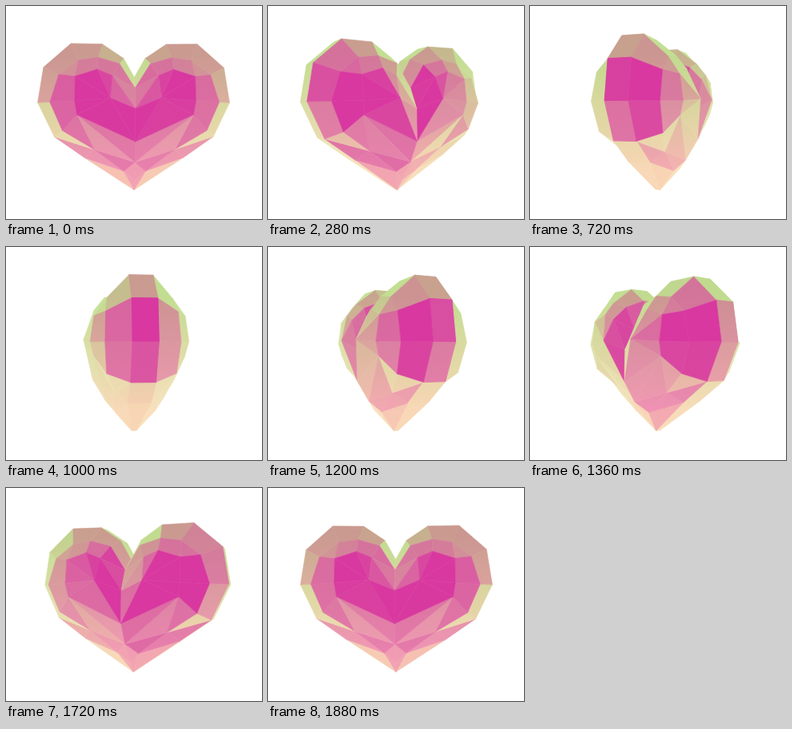
Animation, 320 px wide and 267 px high, one loop 1.92 s. Source, as an HTML page with a canvas:

```html
<!DOCTYPE html>
<html lang="en">
<head>
<meta charset="utf-8">
<title>Turning heart gem</title>
<style>
  html, body { margin: 0; width: 100%; height: 100%; overflow: hidden; background: #fff; }
  canvas { display: block; width: 100vw; height: 100vh; }
</style>
</head>
<body>
<canvas id="stage" width="320" height="267"></canvas>
<script>
const LOOP = 1920, STEP = 40;
const CX = 160, CY = 133.5, CAMERA = 520;
const ctx = document.getElementById('stage').getContext('2d');

// One quarter of the gem: x to the right, y down, z to the viewer.
const points = {
  // rim
  a0: [0, -43, 13], a1: [13, -66, 13], a2: [39, -83.5, 13], a3: [77, -84, 13],
  a4: [110, -55, 13], a5: [117, -12, 13], a6: [97, 29.5, 13], a7: [60.5, 55, 13], a8: [0, 96.5, 3],
  // bevel
  b0: [0, -28.5, 36], b1: [18, -57, 36], b2: [43, -64, 38], b3: [66, -61, 36],
  b4: [88, -44, 38], b5: [98, -12, 39], b6: [84, 21, 37],
  // domed front face, p is its peak
  c0: [0, -4.5, 50], c1: [26, -42, 49], c2: [43, -49, 50], c3: [68, -41, 50],
  c4: [68, -13, 54], c5: [66, 2.5, 50], c6: [0, 33, 51], p: [28, -16, 62],
  // lower point
  s: [48, 44, 26], d: [0, 58, 36], e: [13, 70, 25], f: [0, 82, 16]
};

const facets = `a0 b0 b1 a1,a1 b1 b2 a2,a2 b2 b3 a3,a3 b3 b4 a4,a4 b4 b5 a5,a5 b5 b6 a6,
  a6 b6 s,a6 s a7,b0 b1 c1,b1 b2 c2 c1,b2 b3 c3 c2,b3 b4 c3,b4 b5 c4 c3,b5 b6 c5 c4,
  b0 c1 c0,c5 b6 s,c0 c1 p,c1 c2 p,c2 c3 p,c3 c4 p,c4 c5 p,c5 c6 p,c6 c0 p,
  c5 c6 d,c5 d s,s d e,s e a7,a7 e a8,d e f,e f a8`
  .split(',').map(row => row.trim().split(' ').map(name => points[name]));

for (let i = 0; i < 8; i++) {
  const p = points['a' + i], q = points['a' + (i + 1)];
  facets.push([p, q, [q[0], q[1], -q[2]], [p[0], p[1], -p[2]]]);
}

const dot = (u, v) => u[0] * v[0] + u[1] * v[1] + u[2] * v[2];
const sub = (u, v) => u.map((n, i) => n - v[i]);
const unit = v => v.map(n => n / Math.hypot(...v));
const center = poly => [0, 1, 2].map(i => poly.reduce((sum, p) => sum + p[i], 0) / poly.length);

function normalOf(poly) {
  const n = [0, 0, 0];
  poly.forEach((p, i) => {
    const q = poly[(i + 1) % poly.length];
    n[0] += (p[1] - q[1]) * (p[2] + q[2]);
    n[1] += (p[2] - q[2]) * (p[0] + q[0]);
    n[2] += (p[0] - q[0]) * (p[1] + q[1]);
  });
  const out = unit(n);
  return dot(out, sub(center(poly), [40, -10, 0])) < 0 ? out.map(v => -v) : out;
}

const mesh = [];
for (const poly of facets) {
  const normal = normalOf(poly);
  for (const mx of [1, -1]) for (const mz of [1, -1]) {
    const flip = p => [p[0] * mx, p[1], p[2] * mz];
    mesh.push({ poly: poly.map(flip), normal: flip(normal) });
  }
}

// Facing ratio, colour at the top, colour at the bottom.
const ramp = [
  [0, [196, 228, 152], [248, 228, 192]],
  [0.35, [192, 218, 142], [248, 212, 180]],
  [0.45, [200, 162, 142], [243, 172, 176]],
  [0.63, [204, 146, 146], [240, 147, 180]],
  [0.78, [216, 98, 160], [222, 104, 164]],
  [0.89, [216, 56, 159], [216, 56, 159]],
  [1.01, [216, 56, 159], [216, 56, 159]]
];

function shade(light) {
  const i = Math.max(1, ramp.findIndex(stop => stop[0] > light));
  const low = ramp[i - 1], high = ramp[i];
  const k = Math.max(0, (light - low[0]) / (high[0] - low[0]));
  const fill = ctx.createLinearGradient(0, 60, 0, 205);
  for (const side of [1, 2]) {
    const rgb = low[side].map((v, c) => Math.round(v + (high[side][c] - v) * k));
    fill.addColorStop(side - 1, `rgb(${rgb})`);
  }
  return fill;
}

function draw(time) {
  const angle = Math.PI * time / LOOP;
  const cos = Math.cos(angle), sin = Math.sin(angle);
  const turn = ([x, y, z]) => [x * cos + z * sin, y, z * cos - x * sin];
  const visible = [];
  for (const { poly, normal } of mesh) {
    const turned = poly.map(turn), mid = center(turned);
    const facing = dot(turn(normal), unit(sub([0, 0, CAMERA], mid)));
    // Facets that look down are a little paler.
    const light = facing - 0.15 * Math.max(0, normal[1]);
    if (facing > 0) visible.push({ turned, light, depth: mid[2] });
  }
  visible.sort((p, q) => p.depth - q.depth);

  ctx.fillStyle = '#fff';
  ctx.fillRect(0, 0, 320, 267);
  ctx.lineWidth = 0.6;
  ctx.lineJoin = 'round';
  for (const { turned, light } of visible) {
    ctx.beginPath();
    for (const [x, y, z] of turned) {
      const scale = CAMERA / (CAMERA - z);
      ctx.lineTo(CX + x * scale, CY + y * scale);
    }
    ctx.closePath();
    ctx.fillStyle = ctx.strokeStyle = shade(light);
    ctx.fill();
    ctx.stroke();
  }
}

const start = performance.now();
function tick() {
  const time = (performance.now() - start) % LOOP;
  // Each pose is taken from the middle of its step.
  draw((Math.floor(time / STEP) + 0.5) * STEP);
  requestAnimationFrame(tick);
}
tick();
</script>
</body>
</html>
```
